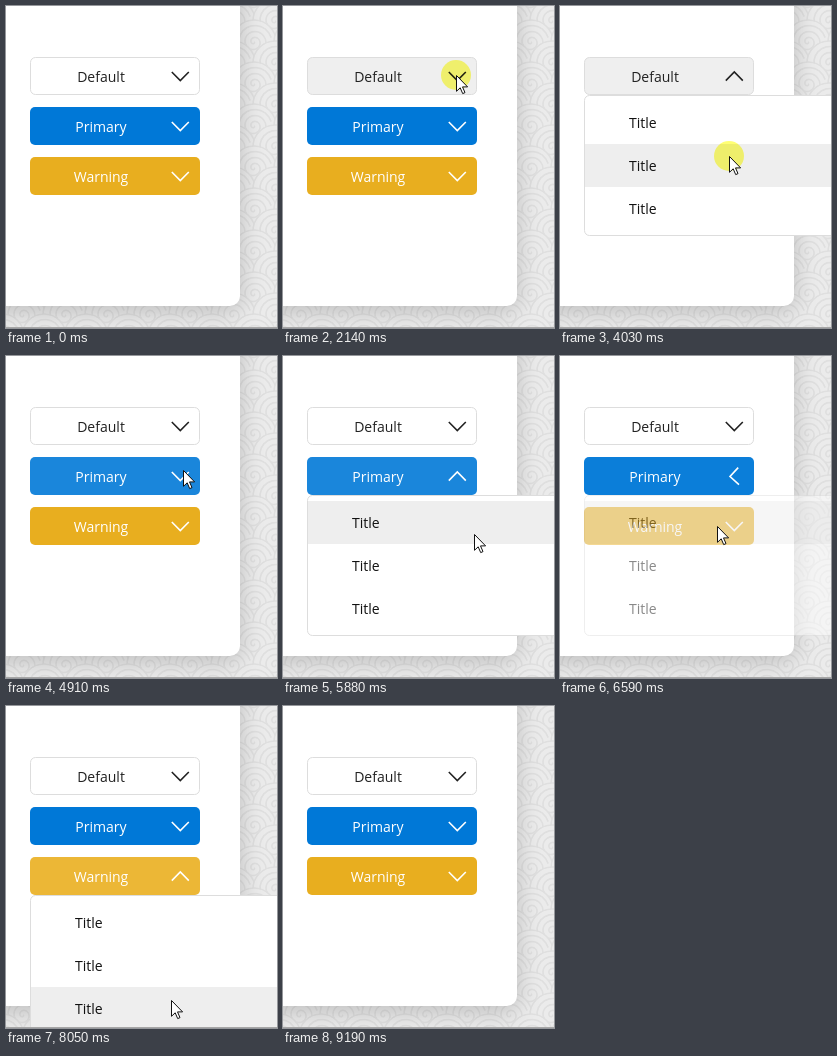
An HTML page for the animation above (9.26 s loop, 271 by 322 pixels).

```html
<!DOCTYPE html>
<html lang="en">
<head>
<meta charset="utf-8">
<title>Dropdown buttons</title>
<style>
  html, body { margin: 0; width: 100%; height: 100%; overflow: hidden; background: #eaeaea; }
  svg { position: absolute; left: 0; top: 0; display: block; }
  #card {
    position: absolute; left: -40px; top: -40px; width: 274px; height: 340px;
    background: #fff; border-radius: 10px; box-shadow: 0 5px 24px rgba(0, 0, 0, .2);
  }
  text { font: 14px "Open Sans", "Noto Sans", sans-serif; }
</style>
</head>
<body>
<svg id="back" width="271" height="322"></svg>
<div id="card"></div>
<svg id="stage" width="271" height="322"></svg>
<script>
const LOOP = 9260, OPEN_TIME = 440, ROW = 43;

// [time, x, y] stops of the pointer
const path = [
  [0, 300, 134], [90, 282, 131], [580, 172, 66], [940, 172, 66], [1080, 173, 69],
  [3230, 173, 69], [3720, 169, 150], [4570, 169, 150], [4890, 177, 114],
  [5560, 177, 114], [5860, 191, 178], [5900, 191, 178], [6070, 157, 170],
  [7500, 157, 170], [8045, 165, 294], [8720, 165, 294], [8960, 240, 324], [LOOP, 250, 340]
];

// [from, to] of each mouse press
const presses = [[2140, 2530], [4030, 4110], [5290, 5400], [6520, 6570], [7020, 7130], [8300, 8380]];

const items = [
  { label: "Default", y: 51, ink: "#222", base: [255, 255, 255], over: [239, 239, 239], line: "#ddd",
    hover: [[450, 0], [750, 1], [4090, 1], [4350, 0]], open: 2614, close: [4090, 4290] },
  { label: "Primary", y: 101, ink: "#fff", base: [0, 120, 215], over: [26, 134, 219],
    hover: [[4700, 0], [4880, 1], [6520, 1], [6640, 0]], open: 5320, close: [6540, 6640] },
  { label: "Warning", y: 151, ink: "#fff", base: [232, 174, 31], over: [236, 183, 54],
    hover: [[6540, 0], [6640, 1], [8330, 1], [8540, 0]], open: 7047, close: [8350, 8550] }
];

const stage = document.getElementById("stage");

function add(parent, tag, attrs, text) {
  const el = document.createElementNS("http://www.w3.org/2000/svg", tag);
  set(el, attrs);
  if (text) el.textContent = text;
  parent.appendChild(el);
  return el;
}
function set(el, attrs) {
  for (const k in attrs) el.setAttribute(k, attrs[k]);
}
const clamp = v => Math.max(0, Math.min(1, v));
const span = (t, a, b) => clamp((t - a) / (b - a));
const smooth = p => p * p * (3 - 2 * p);

function track(stops, t, ease = p => p) {
  if (t <= stops[0][0]) return stops[0].slice(1);
  for (let i = 1; i < stops.length; i++) {
    const a = stops[i - 1], b = stops[i];
    if (t < b[0]) {
      const p = ease(span(t, a[0], b[0]));
      return a.slice(1).map((v, k) => v + (b[k + 1] - v) * p);
    }
  }
  return stops[stops.length - 1].slice(1);
}

function spiral(cx, cy, turns, gap) {
  let d = "";
  for (let a = 0; a <= turns * 2 * Math.PI; a += 0.3) {
    const r = gap * a / (2 * Math.PI);
    d += (d ? "L" : "M") + (cx + r * Math.cos(a)).toFixed(1) + " " + (cy + r * Math.sin(a)).toFixed(1);
  }
  return d;
}

function buildBack() {
  const back = document.getElementById("back");
  for (let row = 0; row < 18; row++) {
    for (let col = 0; col < 8; col++) {
      const cx = col * 42 + (row % 2) * 21 - 4, cy = row * 21 - 6;
      add(back, "circle", { cx, cy, r: 22, fill: "#ebebeb", stroke: "#dfdfdf", "stroke-width": 1.5 });
      add(back, "path", { d: spiral(cx, cy, 3, 6), fill: "none", stroke: "#dfdfdf", "stroke-width": 1.6 });
    }
  }
}

function buildButton(it) {
  const inset = it.line ? 0.5 : 0;
  it.box = add(stage, "rect", {
    x: 24 + inset, y: it.y + inset, width: 170 - 2 * inset, height: 38 - 2 * inset,
    rx: 5, stroke: it.line || "none"
  });
  add(stage, "text", { x: 95, y: it.y + 25, "text-anchor": "middle", fill: it.ink }, it.label);
  it.arrow = add(stage, "path", {
    d: "M-8.5 -4.3L0 4.3L8.5 -4.3", fill: "none", stroke: it.ink, "stroke-width": 1.6
  });
}

function buildMenu(it) {
  const top = it.y + 38;
  it.menu = add(stage, "g", {});
  it.panel = add(it.menu, "g", {});
  add(it.panel, "rect", { x: 24.5, y: top + 0.5, width: 300, height: 140, rx: 5, fill: "#fff", stroke: "#ddd" });
  it.rows = [0, 1, 2].map(i => {
    const y = top + 6 + i * ROW;
    return {
      y,
      bg: add(it.panel, "rect", { x: 25, y, width: 299, height: ROW, fill: "#eee" }),
      text: add(it.menu, "text", { y: y + 27, fill: "#111" }, "Title")
    };
  });
}

buildBack();
items.forEach(buildButton);
items.forEach(buildMenu);
add(stage, "rect", { x: 0, y: 321, width: 271, height: 1, fill: "#a6a6a6" });
const halo = add(stage, "circle", { r: 15, fill: "#ffff73", style: "mix-blend-mode:multiply" });
const pointer = add(stage, "path", {
  d: "M.5 .5V16.3L4.2 12.8L6.7 18.6L9 17.6L6.5 11.9H11.6Z",
  fill: "#fff", stroke: "#111", "stroke-width": 1
});

function drawItem(it, t, y) {
  const [h] = track(it.hover, t);
  const rgb = it.base.map((v, i) => Math.round(v + (it.over[i] - v) * h));
  it.box.setAttribute("fill", `rgb(${rgb})`);

  const p = span(t, it.open, it.open + OPEN_TIME);
  const gone = span(t, ...it.close);
  const turn = 180 * (smooth(span(t, it.open, it.open + 150)) - smooth(gone));
  it.arrow.setAttribute("transform", `translate(174.3 ${it.y + 19.3}) rotate(${turn})`);

  const shown = p > 0 && gone < 1;
  it.menu.setAttribute("display", shown ? "inline" : "none");
  if (!shown) return;
  it.menu.setAttribute("opacity", 1 - gone);
  it.panel.setAttribute("opacity", 1 - (1 - p) ** 4);
  for (const row of it.rows) {
    const on = y >= row.y && y < row.y + ROW;
    row.bg.setAttribute("opacity", on ? 1 : 0);
    set(row.text, { x: 69 + 60 * (1 - p) ** 3, opacity: p });
  }
}

function draw(t) {
  const [x, y] = track(path, t, smooth);
  items.forEach(it => drawItem(it, t, y));
  pointer.setAttribute("transform", `translate(${x} ${y})`);
  const down = presses.some(([a, b]) => t >= a && t < b);
  set(halo, { cx: x, cy: y, display: down ? "inline" : "none" });
}

const start = performance.now();
function tick() {
  draw((performance.now() - start) % LOOP);
  requestAnimationFrame(tick);
}
tick();
</script>
</body>
</html>
```
